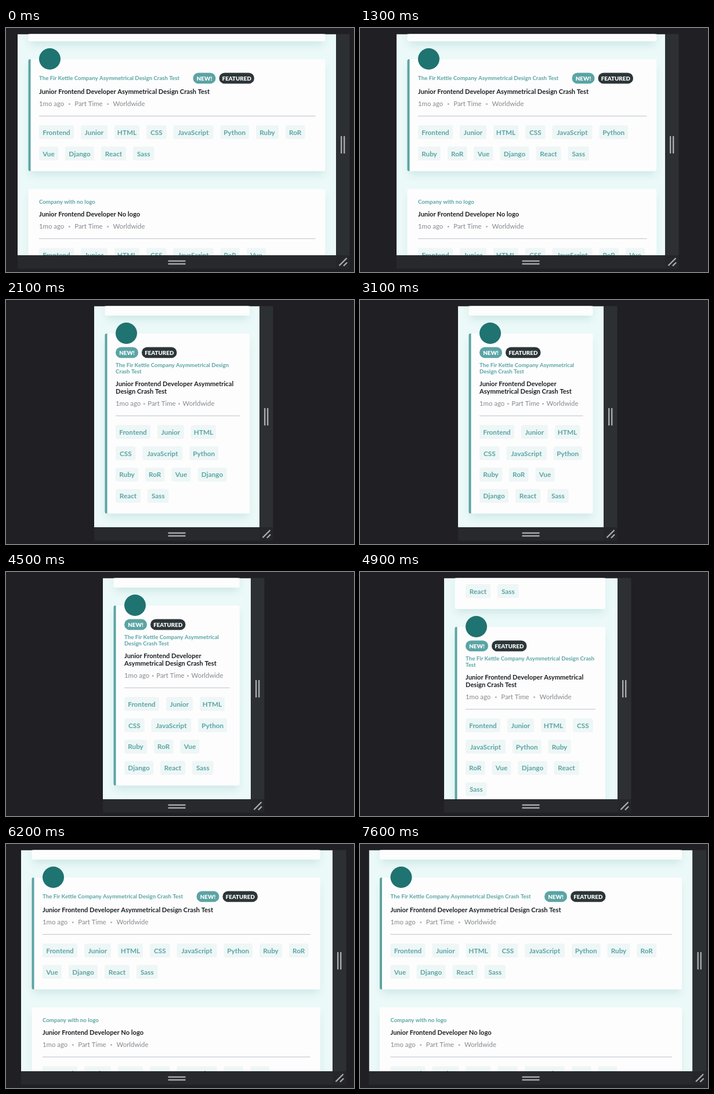
Animation, 600 px wide and 422 px high, one loop 8.3 s. Source, as an HTML page with a canvas:

```html
<!DOCTYPE html>
<html lang="en">
<head>
<meta charset="utf-8">
<title>Responsive job list</title>
<style>
  html, body { margin: 0; width: 100%; height: 100%; overflow: hidden; background: #201f24; }
  canvas { display: block; }
</style>
</head>
<body>
<canvas id="stage" width="600" height="422"></canvas>
<script>
const ctx = document.getElementById('stage').getContext('2d');
const LOOP = 8300, STEP = 100, CENTER = 294.5;
const LAYOUT_LAG = 18; // the page reflows slightly after the frame moves
const TOP = 10.6, BOTTOM = 393, BAR = 23.5;
const TEAL = '#5ba4a4';
const FONT = 'Lato, sans-serif';

// Left edge of the resized viewport over time; it stays centred.
const drag = [
  [0, 20], [900, 20], [1300, 63], [1800, 138], [2100, 152], [2400, 163],
  [2700, 169], [4400, 169], [4600, 165], [4900, 145], [5300, 92],
  [6200, 26], [6500, 19], [6900, 15.5], [LOOP, 15.5]
];

// Box width of each tag.
const tagWidth = {
  Frontend: 60, Junior: 46, HTML: 43, CSS: 34.5, JavaScript: 69, Python: 49.5,
  Ruby: 39, RoR: 33.5, Vue: 33, Django: 50, React: 43, Sass: 36.5
};

const featured = {
  company: 'The Fir Kettle Company Asymmetrical Design Crash Test',
  title: 'Junior Frontend Developer Asymmetrical Design Crash Test',
  tags: Object.keys(tagWidth),
  badges: true
};
const plain = {
  company: 'Company with no logo',
  title: 'Junior Frontend Developer No logo',
  tags: ['Frontend', 'Junior', 'HTML', 'CSS', 'JavaScript', 'RoR', 'Vue']
};

function leftAt(t) {
  const i = drag.findIndex(([time]) => time > t);
  const [t0, a] = drag[i - 1], [t1, b] = drag[i];
  return a + (b - a) * (t - t0) / (t1 - t0);
}

function box(x, y, w, h, r, fill) {
  ctx.fillStyle = fill;
  ctx.beginPath();
  ctx.roundRect(x, y, w, h, r);
  ctx.fill();
}

function circle(x, y, r, fill) {
  ctx.fillStyle = fill;
  ctx.beginPath();
  ctx.arc(x, y, r, 0, Math.PI * 2);
  ctx.fill();
}

function setFont(weight, size) {
  ctx.font = `${weight} ${size}px ${FONT}`;
}

// Draws text around a vertical centre and returns its width.
function text(str, x, midY, weight, size, fill, align = 'left') {
  setFont(weight, size);
  ctx.textAlign = align;
  ctx.fillStyle = fill;
  ctx.fillText(str, x, midY + size * 0.36);
  return ctx.measureText(str).width;
}

function wrapText(str, width, weight, size) {
  setFont(weight, size);
  const lines = [''];
  for (const word of str.split(' ')) {
    const last = lines.length - 1;
    const longer = lines[last] ? lines[last] + ' ' + word : word;
    if (ctx.measureText(longer).width <= width) lines[last] = longer;
    else lines.push(word);
  }
  return lines;
}

// Draws wrapped text and returns the centre of its last line.
function paragraph(str, x, y, width, weight, size, lineHeight, fill) {
  const lines = wrapText(str, width, weight, size);
  lines.forEach((line, i) => text(line, x, y + i * lineHeight, weight, size, fill));
  return y + (lines.length - 1) * lineHeight;
}

function wrapTags(tags, width) {
  const rows = [];
  let x = Infinity;
  for (const name of tags) {
    if (x + tagWidth[name] > width) {
      rows.push([]);
      x = 0;
    }
    rows.at(-1).push({ name, x });
    x += tagWidth[name] + 12;
  }
  return rows;
}

function drawTagRow(row, x, y) {
  for (const tag of row) {
    const w = tagWidth[tag.name];
    box(x + tag.x, y, w, 24, 3, '#eef6f6');
    text(tag.name, x + tag.x + w / 2, y + 12.3, 700, 11.75, TEAL, 'center');
  }
}

function badge(label, x, midY, w, fill) {
  box(x, midY - 9.3, w, 18.6, 9.3, fill);
  text(label, x + w / 2, midY + 0.2, 900, 9.8, '#fff', 'center');
}

function meta(x, y, gap) {
  ['1mo ago', 'Part Time', 'Worldwide'].forEach((part, i) => {
    if (i) {
      circle(x + gap / 2, y + 0.5, 1.5, '#b0b4b6');
      x += gap;
    }
    x += text(part, x, y, 400, 11.4, '#84898c');
  });
}

function cardBack(x, y, w, h) {
  ctx.save();
  ctx.shadowColor = 'rgba(91,164,164,.2)';
  ctx.shadowBlur = 14;
  ctx.shadowOffsetY = 9;
  box(x + 3, y + 3, w - 6, h - 6, 3, '#fdfdfe');
  ctx.restore();
  box(x, y, w, h, 3, '#fdfdfe');
}

function drawCard(job, left, top, width) {
  const x = left + 37, inner = width - 73;
  const inline = inner >= 370;
  const stacked = job.badges && !inline;

  // The card height depends on the wrapping, so measure first.
  const companyLines = wrapText(job.company, inner, 700, 9.7).length;
  const titleLines = wrapText(job.title, inner, 700, 11.15).length;
  const companyY = top + (job.badges ? (stacked ? 54.5 : 32.6) : 22);
  const titleY = companyY + (companyLines - 1) * 11.5 + (job.badges && inline ? 22.9 : 21);
  const metaY = titleY + (titleLines - 1) * 12.5 + 21.5;
  const lineY = metaY + 21.3;
  const rows = wrapTags(job.tags, inner);
  const bottom = lineY + 16 + (rows.length - 1) * 36.8 + 24 + 18.5;

  cardBack(left + 18.5, top, width - 37, bottom - top);
  if (job.badges) {
    box(left + 18.5, top, 4, bottom - top, [3, 0, 0, 3], TEAL);
    circle(x + 18.5, top - 0.5, 18.5, '#1f7371');
    const badgeX = inline ? x + 265.5 : x;
    badge('NEW!', badgeX, top + 32.9, 39, TEAL);
    badge('FEATURED', badgeX + 45, top + 32.9, 60.5, '#2c3638');
  }
  paragraph(job.company, x, companyY, inner, 700, 9.7, 11.5, TEAL);
  paragraph(job.title, x, titleY, inner, 700, 11.15, 12.5, '#1d2023');
  meta(x, metaY, width < 292 ? 12 : 18);
  box(x, lineY - 0.6, inner + 0.5, 1.2, 0, '#c9ccd1');
  rows.forEach((row, i) => drawTagRow(row, x, lineY + 16 + i * 36.8));
  return bottom;
}

function drawPage(t, left, width, pageWidth) {
  const inline = pageWidth - 73 >= 370;
  let top = 58;
  if (t < 3000 && inline) top = 54;
  if (t > 4400 && pageWidth >= 292 && !inline) top = 95;

  ctx.save();
  ctx.beginPath();
  ctx.rect(left, TOP, width, BOTTOM - TOP);
  ctx.clip();
  ctx.fillStyle = '#ebf9f8';
  ctx.fillRect(left, TOP, width, BOTTOM - TOP);

  cardBack(left + 18.5, top - 331, pageWidth - 37, 300);
  drawTagRow(wrapTags(['React', 'Sass'], pageWidth)[0], left + 37, top - 74);
  const bottom = drawCard(featured, left, top, pageWidth);
  drawCard(plain, left, bottom + 31, pageWidth);
  ctx.restore();
}

function line(x0, y0, x1, y1) {
  ctx.beginPath();
  ctx.moveTo(x0, y0);
  ctx.lineTo(x1, y1);
  ctx.stroke();
}

function drawHandles(left, right) {
  box(right, TOP, BAR, BOTTOM - TOP, 0, '#2d3033');
  box(left, BOTTOM, right - left, BAR, 0, '#27292c');
  box(right, BOTTOM, BAR, BAR, 0, '#242629');
  ctx.strokeStyle = '#a9abad';
  ctx.lineWidth = 2.4;
  for (const d of [-2.5, 2.5]) {
    line(right + 11.7 + d, 187, right + 11.7 + d, 217);
    line(CENTER - 15, 405.5 + d, CENTER + 15, 405.5 + d);
  }
  line(right + 5.5, 411, right + 18.5, 398);
  line(right + 13, 411.5, right + 19, 405.5);
}

function draw(now) {
  const t = Math.floor(now % LOOP / STEP) * STEP;
  const left = leftAt(t), right = 2 * CENTER - left;
  const pageWidth = 2 * (CENTER - leftAt(Math.max(0, t - LAYOUT_LAG)));
  ctx.fillStyle = '#201f24';
  ctx.fillRect(0, 0, 600, 422);
  drawPage(t, left, right - left, pageWidth);
  drawHandles(left, right);
}

const start = performance.now();
function tick() {
  draw(performance.now() - start);
  requestAnimationFrame(tick);
}
tick();
</script>
</body>
</html>
```
